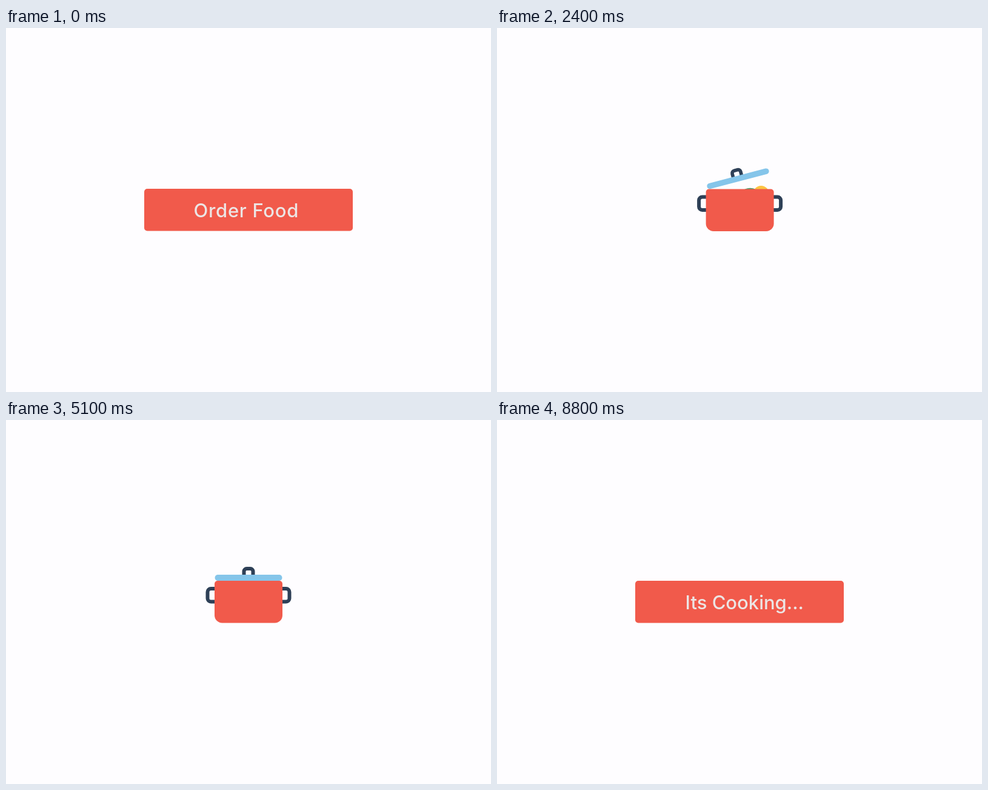
Write an HTML page with a canvas that moves like this. It is 800 px wide and 600 px high and loops after 8900 ms.

```html
<!DOCTYPE html>
<html lang="en">
<head>
<meta charset="utf-8">
<title>Order button</title>
<style>
  html, body { margin: 0; width: 100%; height: 100%; overflow: hidden; background: #fefdff; }
  canvas { display: block; width: 800px; height: 600px; }
</style>
</head>
<body>
<canvas id="stage" width="800" height="600"></canvas>
<script>
const ctx = document.getElementById('stage').getContext('2d');
const LOOP = 8900;
const RED = '#f15a4b', BLUE = '#85c5ea', DARK = '#2e4057';
const YELLOW = '#fcc443', GREEN = '#4b9d6c', PAPER = '#fefdff', INK = '#ece5e4';
const LID_START = 1995, LID_PERIOD = 620, LID_COUNT = 5;

const clamp = v => Math.max(0, Math.min(1, v));
const part = (t, a, b) => clamp((t - a) / (b - a));
const mix = (a, b, p) => a + (b - a) * p;
const inOut = u => u < 0.5 ? 4 * u ** 3 : 1 - 4 * (1 - u) ** 3;
const outBack = u => 1 + 2.2 * (u - 1) ** 3 + 1.2 * (u - 1) ** 2;

function box(x, y, w, h, r) {
  ctx.beginPath();
  ctx.roundRect(x, y, w, h, r);
}

function fillBox(color, ...shape) {
  ctx.fillStyle = color;
  box(...shape);
  ctx.fill();
}

function ring(...shape) {
  ctx.strokeStyle = DARK;
  ctx.lineWidth = 6;
  box(...shape);
  ctx.stroke();
}

function blob(color, x, y, rx, ry) {
  ctx.fillStyle = color;
  ctx.beginPath();
  ctx.ellipse(x, y, rx, ry, 0, 0, Math.PI * 2);
  ctx.fill();
}

// 0 is the wide button, 1 is the pot
function potness(t) {
  if (t < 6750) return inOut(part(t, 1095, 2085));
  return 1 - inOut(part(t, 6750, 7556) ** 0.59);
}

function lidPhase(t) {
  const n = (t - LID_START) / LID_PERIOD;
  return n > 0 && n < LID_COUNT ? n % 1 : 0;
}

function drawFood(phase) {
  const s = part(phase, 0.28, 0.69);
  const hop = 4 * s * (1 - s);
  if (!hop) return;
  blob(GREEN, 417, 278 - 28 * hop, 12, 6);
  blob(YELLOW, 435, 282.5 - 32 * hop, 13, 13);
}

function drawLid(p, phase) {
  const lift = ((1 - Math.cos(phase * Math.PI * 2)) / 2) ** 1.65;
  const angle = 22 * lift;
  const open = clamp(angle / 8);
  const size = 1 - 0.05 * open;
  ctx.save();
  ctx.translate(349.5 + open, 260);
  ctx.rotate(-angle * Math.PI / 180);
  ctx.scale(size, size);
  ctx.translate(-349.5, -260);

  const knob = 124 - 33 * p - 70 * p * p;
  const top = 268 - 26 * p;
  ctx.globalAlpha = 0.4 + 0.6 * p;
  ring(403 - knob / 2, top + 3, knob - 6, 14, 4.5);
  ctx.globalAlpha = 1;

  const w = 111 + 198 * (1 - p);
  fillBox(BLUE, 400 - w / 2, 255 + 19.5 * (1 - p) ** 2.4, w, 10, 5);
  ctx.restore();
}

function drawBody(p, t) {
  const w = mix(344, 112, p);
  const swell = 1.2 * Math.sin(Math.PI * part(t, 1050, 2000));
  const bottom = mix(5, 12.5, p);
  fillBox(RED, 400 - w / 2, 265 - swell, w, 69.5 + 2 * swell, [5 + swell, 5 + swell, bottom, bottom]);
}

function drawBadge(t) {
  const away = part(t, 6750, 7450);
  const r = 19 * outBack(part(t, 5220, 5700)) * (1 - away * away);
  if (t < 5220 || r <= 0) return;
  ctx.globalAlpha = 1 - 0.8 * away * away;
  blob(PAPER, 400, 300, r, r);
  ctx.globalAlpha = 1;

  const shown = part(t, 5400, 5700) * (1 - part(t, 6750, 7100));
  if (!shown) return;
  const length = 29.8;
  ctx.strokeStyle = RED;
  ctx.lineWidth = 4;
  ctx.setLineDash([length * shown, 60]);
  ctx.beginPath();
  ctx.moveTo(390.5, 300);
  ctx.lineTo(396.7, 308);
  ctx.lineTo(409.5, 293);
  ctx.stroke();
  ctx.setLineDash([]);
}

function label(text, x, spacing, alpha) {
  if (!alpha) return;
  ctx.globalAlpha = alpha;
  ctx.fillStyle = INK;
  ctx.font = '500 31px Inter, "Open Sans", sans-serif';
  ctx.letterSpacing = spacing + 'px';
  ctx.fillText(text, x, 312);
  ctx.globalAlpha = 1;
}

function draw(t) {
  ctx.fillStyle = PAPER;
  ctx.fillRect(0, 0, 800, 600);
  const p = potness(t);
  const phase = lidPhase(t);
  const boiling = part(t, 1995, 2200) * (1 - part(t, 4900, 5095));
  const shake = 0.6 * boiling * Math.sin((t - 2300) / 400 * Math.PI * 2);

  ctx.save();
  ctx.translate(shake, shake * 0.8);
  if (p > 0) {
    ring(332.5, 278, 135, 21.5, 5.5);
    drawFood(phase);
    drawLid(p, phase);
  }
  drawBody(p, t);
  ctx.restore();

  drawBadge(t);
  label('Order Food', 309.5, 0.7, 1 - part(t, 0, 800));
  label('Its Cooking...', 310.5, 0, part(t, 7600, 8500));
}

const start = performance.now();
function tick() {
  draw((performance.now() - start) % LOOP);
  requestAnimationFrame(tick);
}
tick();
</script>
</body>
</html>
```
